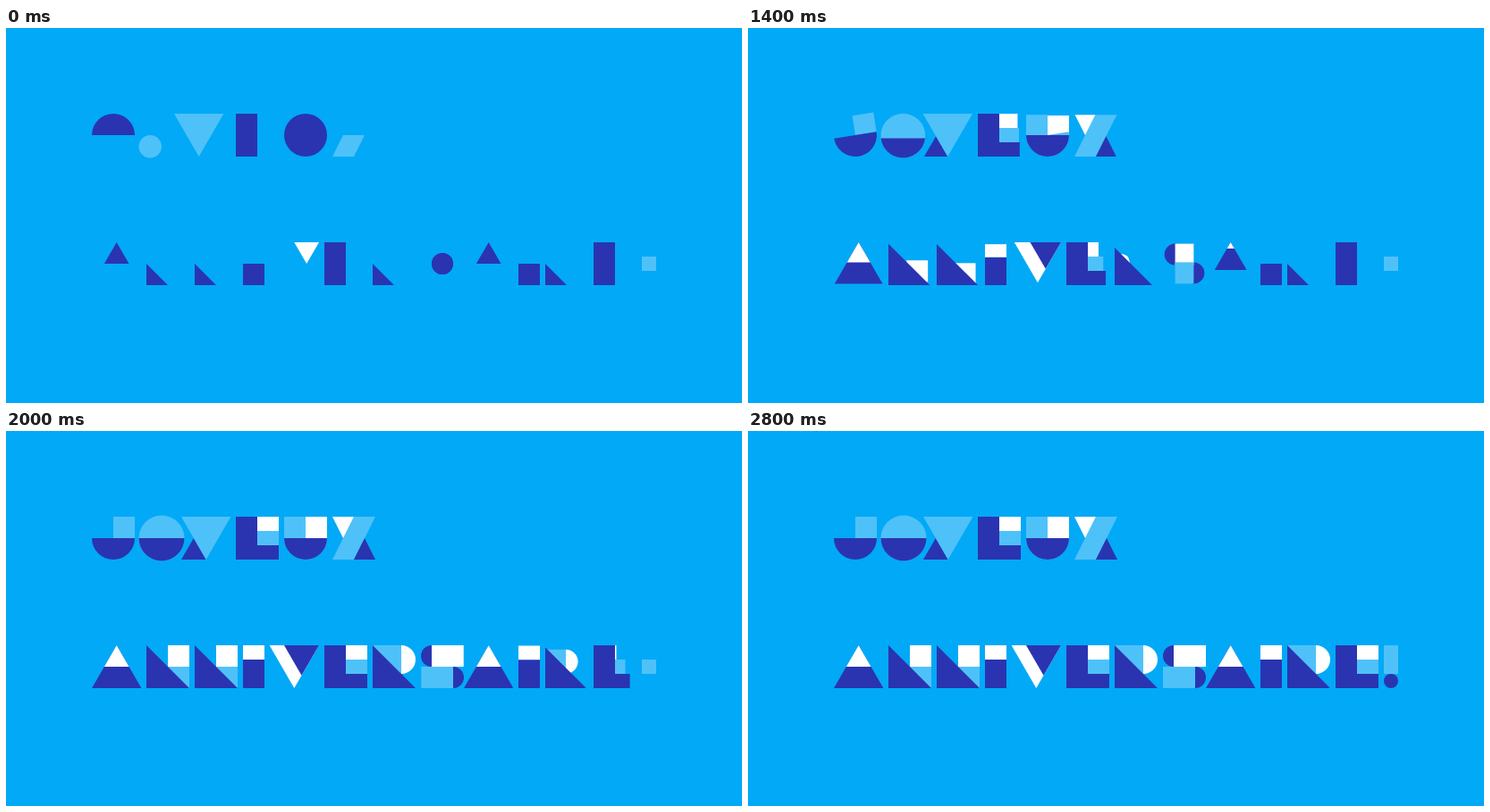
Animation of 823x420 px, one loop 3150 ms. Source, as an HTML page with a canvas:

```html
<!DOCTYPE html>
<html lang="fr">
<head>
<meta charset="utf-8">
<title>Joyeux anniversaire</title>
<style>
  html, body { margin: 0; width: 100%; height: 100%; overflow: hidden; background: #02a9f7; }
  canvas { display: block; }
</style>
</head>
<body>
<canvas id="stage" width="823" height="420"></canvas>
<script>
const ctx = document.getElementById('stage').getContext('2d');
const SKY = '#02a9f7', DARK = '#2a34b1', LIGHT = '#4fc1f9', WHITE = '#fff';
const LOOP = 3150, STEP = 50, HOLD = 1050, SIDE = 55.4;
let now = 0;

// Quintic ease-out progress of a move beginning at `start`.
function ease(start, duration = 1000) {
  const x = Math.min(1, Math.max(0, (now - start) / duration));
  return 1 - (1 - x) ** 5;
}
const mix = (a, b, p) => a + (b - a) * p;

function rect(color, x, y, w, h) {
  if (w <= 0 || h <= 0) return;
  ctx.fillStyle = color;
  ctx.fillRect(x, y, w, h);
}
function poly(color, ...points) {
  ctx.fillStyle = color;
  ctx.beginPath();
  points.forEach(([x, y]) => ctx.lineTo(x, y));
  ctx.fill();
}
function arc(color, x, y, r, from = 0, to = 2 * Math.PI) {
  ctx.fillStyle = color;
  ctx.beginPath();
  ctx.arc(x, y, r, from, to);
  ctx.fill();
}
function blend(p) {
  const a = [42, 52, 177], b = [79, 193, 249];
  return `rgb(${a.map((v, i) => Math.round(mix(v, b[i], p)))})`;
}

function drawJ(s) {
  ctx.save();
  ctx.translate(120, 120);
  ctx.rotate(-Math.PI * (1 - ease(s)));
  const h = 24 * ease(s + 100, 900);
  rect(LIGHT, 0, -h, 24, h);
  arc(DARK, 0, 0, 24, 0, Math.PI);
  ctx.restore();
}

function drawO(s) {
  const r = 25.5 * mix(0.5, 1, ease(s));
  const x = 148.5 + r, y = 145.5 - r;
  arc(LIGHT, x, y, r);
  const tilt = Math.asin(1 - ease(s + 100));
  if (tilt < Math.PI / 2) arc(DARK, x, y, r, tilt, Math.PI - tilt);
}

function drawY(s) {
  const p = ease(s), x = 188 + 8 * p, tip = x + SIDE / 2, w = p * SIDE / 2;
  poly(DARK, [tip, 144], [tip - w, 144], [tip - w / 2, 144 - 24 * p]);
  poly(LIGHT, [x, 96], [x + SIDE, 96], [tip, 144]);
}

function drawE(s, x, y) {
  rect(DARK, x, y, 24, 48);
  rect(DARK, x + 24, y + 32, 24 * ease(s), 16);
  rect(LIGHT, x + 24, y + 16, 24 * ease(s + 100, 900), 16);
  rect(WHITE, x + 24, y, 24 * ease(s + 200, 800), 16);
}

function drawU(s) {
  const p = ease(s), h = 24 * ease(s + 100, 900);
  rect(LIGHT, 311, 120 - 24 * p, 24, 24 * p);
  rect(WHITE, 335, 120 - h, 24, h);
  const turn = Math.PI * (1 + p);
  arc(blend(p), 335, 120, 24, turn, turn + Math.PI);
  arc(DARK, 335, 120, 24, 0, Math.PI);
}

function drawX(s) {
  const p = ease(s), h = 24 + 24 * p, w = 24 * p;
  poly(LIGHT, [365, 144], [389, 144], [389 + h / 2, 144 - h], [365 + h / 2, 144 - h]);
  poly(WHITE, [377 - w / 2, 120 - w], [377 + w / 2, 120 - w], [377, 120]);
  poly(DARK, [389, 144], [389 + w, 144], [389 + w / 2, 144 - w]);
}

function drawA(s, x) {
  const p = ease(s);
  const peak = (color, h) => {
    const half = h * SIDE / 96;
    poly(color, [x, 240], [x + half, 240 + h], [x - half, 240 + h]);
  };
  peak(DARK, 24 + 24 * p);
  peak(WHITE, 24 * p);
}

function wedge(x, size) {
  poly(DARK, [x, 288 - size], [x + size, 288], [x, 288]);
}

function drawN(s, x) {
  const right = x + 48 * ease(s + 55, 900), left = Math.max(x, right - 24);
  const y = mix(267.5, 240, ease(s + 375, 620));
  rect(WHITE, left, y, right - left, Math.min(24, 288 - y));
  rect(LIGHT, left, y + 24, right - left, 264 - y);
  wedge(x, 24 + 24 * ease(s));
}

function drawI(s, x) {
  const p = ease(s), top = 264 - 8 * p;
  rect(DARK, x, top, 24, 288 - top);
  rect(WHITE, x, top - 16 * p, 24, 16 * p);
}

function drawV(s) {
  const p = ease(s);
  const drop = (color, w) =>
    poly(color, [350, 240], [350 - w, 240], [350 - w / 2, 240 + w * 48 / SIDE]);
  drop(WHITE, SIDE * (1 + p) / 2);
  drop(DARK, 39 * p);
}

function drawR(s, x) {
  const r = 16 * ease(s + 100, 900), slide = ease(s + 200, 800);
  const cx = x + 32 * slide, cy = mix(264, 256, slide);
  rect(LIGHT, x, cy - r, cx - x, 2 * r);
  arc(WHITE, cx, cy, r, -Math.PI / 2, Math.PI / 2);
  wedge(x, 24 + 24 * ease(s));
}

function drawS(s) {
  const d = 12 * ease(s, 500), extend = 12 * ease(s + 500, 500);
  arc(DARK, 488 - d, 264 - d, 12);
  arc(DARK, 488 + d, 264 + d, 12);
  if (!d) return;
  rect(WHITE, 488 - d, 252 - d, 2 * d + extend, 24);
  rect(LIGHT, 488 - d - extend, 252 + d, 2 * d + extend, 24);
}

function drawBang(s) {
  const rise = 16 * ease(s);
  arc(DARK, 719, 264 + rise, 8);
  rect(LIGHT, 711, 256 - rise, 16, 16 + rise);
}

function render(time) {
  const t = Math.floor((time % LOOP) / STEP) * STEP;
  now = t < HOLD ? 0 : t;
  rect(SKY, 0, 0, 823, 420);

  [drawJ, drawO, drawY, drawU, drawX].forEach(draw => draw(947));
  drawE(947, 257, 96);

  drawA(970, 123.7);
  drawN(988, 157);
  drawN(1005, 211);
  drawI(1018, 265);
  drawV(1050);
  drawE(1097, 356, 240);
  drawR(1158, 410);
  drawS(1235);
  drawA(1332, 539.7);
  drawI(1460, 573);
  drawR(1620, 603);
  drawE(1790, 657, 240);
  drawBang(2057);
}

const begin = performance.now();
function tick() {
  render(performance.now() - begin);
  requestAnimationFrame(tick);
}
tick();
</script>
</body>
</html>
```
